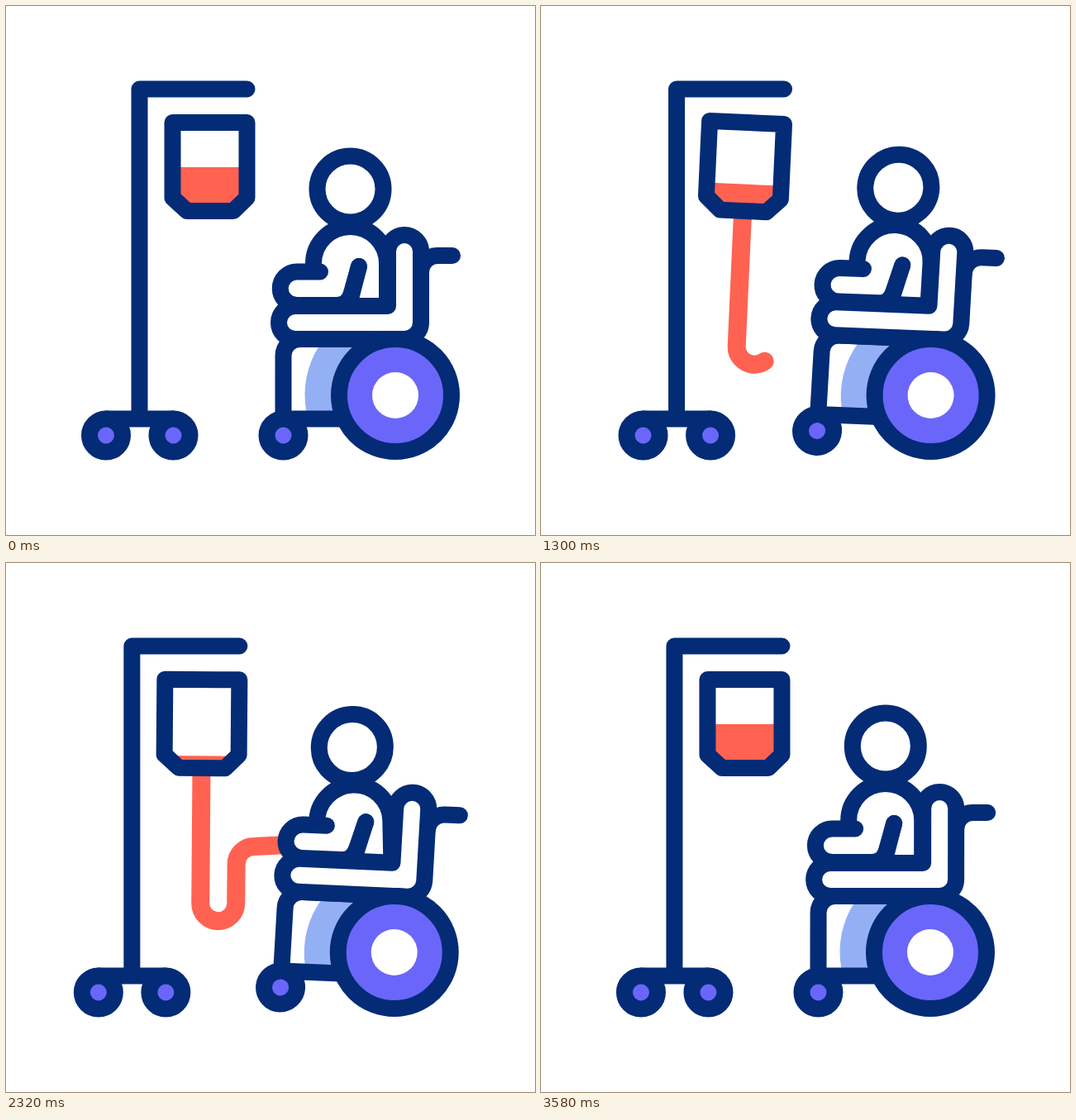
An HTML page that plays this animation: 640x640 px, repeating every 3.6 s.

```html
<!DOCTYPE html>
<html lang="en">
<head>
<meta charset="utf-8">
<title>Drip stand and wheelchair</title>
<style>
  html, body { margin: 0; width: 100%; height: 100%; overflow: hidden; background: #fff; }
  svg { display: block; width: 100vw; height: 100vh; }
  .line { fill: none; stroke: #042b76; stroke-width: 20; stroke-linecap: round; stroke-linejoin: round; }
  .white { fill: #fff; }
  .violet { fill: #6a66fa; }
  .pale { fill: #94b0f5; }
  .red { fill: #ff6251; }
  #tube { fill: none; stroke: #ff6251; stroke-width: 22; stroke-linecap: round; stroke-linejoin: round; }
</style>
</head>
<body>
<svg viewBox="0 0 640 640">
  <defs>
    <path id="bagShape" d="M201.5 141H291.5V232L275 248H219L201.5 232Z"/>
    <clipPath id="bagClip"><use href="#bagShape"/></clipPath>
  </defs>

  <path id="tube"/>

  <g id="pole">
    <path class="line" d="M291.5 100.5H161.5V499M121 499.5H202.5"/>
    <circle class="line violet" cx="121" cy="519.5" r="20"/>
    <circle class="line violet" cx="202.5" cy="519.5" r="20"/>
  </g>

  <g id="bag">
    <use href="#bagShape" class="white"/>
    <g clip-path="url(#bagClip)"><rect id="fluid" class="red" x="200" width="94" height="90"/></g>
    <use href="#bagShape" class="line"/>
  </g>

  <g id="chair">
    <path class="pale" d="M379 411A109 109 0 0 0 363.5 491H430V411Z"/>
    <path class="line" d="M440 499.5H335.5V423A20 20 0 0 1 355.5 403H480"/>
    <circle class="line violet" cx="335.5" cy="519.5" r="20"/>
    <path class="line" d="M502 322A20 20 0 0 1 522 302H540"/>
    <g id="person">
      <path class="line white" d="M372 320V311.5A44.5 44.5 0 0 1 461 311.5V363"/>
      <circle class="line white" cx="416.5" cy="221.5" r="40"/>
    </g>
    <path class="line white" d="M380 321.5H352A20 20 0 0 0 352 362H400Q414 362 418 347L427 315"/>
    <path class="line" d="M427 315L416 358"/>
    <path class="line white" d="M482 277A20 20 0 0 1 502 297V383A20 20 0 0 1 482 403H350A20 20 0 0 1 350 363H462V297A20 20 0 0 1 482 277Z"/>
  </g>

  <g id="wheel">
    <circle class="line violet" cx="471" cy="471" r="68"/>
    <circle class="white" cx="471" cy="471" r="28"/>
  </g>
</svg>
<script>
const LOOP = 3600;
const TUBE = 400;
const $ = id => document.getElementById(id);

const smooth = s => s * s * (3 - 2 * s);
const ramp = (t, from, to) => smooth(Math.min(1, Math.max(0, (t - from) / (to - from))));

// Every part sways between rest and rest on the same beats.
const beats = [0, 430, 880, 1365, 1965, 2510, 3035, 3590];
const last = beats.length - 1;

function wave(t, peak) {
  const value = i => i > 0 && i < last ? peak(i) : 0;
  let i = 1;
  while (i < last && t >= beats[i]) i++;
  const a = value(i - 1);
  return a + (value(i) - a) * ramp(t, beats[i - 1], beats[i]);
}

const odd = i => i % 2 === 1;
const polePeak = i => i === 1 ? 51 : odd(i) ? 5 : -46;
const swingPeak = i => (odd(i) ? 4.4 : -4.4) * (last - i) / (last - 1);
const chairPeak = i => [30, -34, 7, -16, 7, -24][i - 1];
const tiltPeak = i => odd(i) ? 2.6 - .3 * i : 5.9 - .2 * i;
const leanPeak = i => [-1.6, -4.7, .3, 1.3, -6.8, -3.4][i - 1];

const place = (id, m) => $(id).setAttribute("transform", m);

// Tube hangs from the bag and ends under the hand.
function tubePath(bag, chair) {
  const pt = (m, x, y) => {
    const p = m.transformPoint({ x, y });
    return p.x.toFixed(2) + " " + p.y.toFixed(2);
  };
  return `M${pt(bag, 246.5, 247)}L${pt(bag, 246.5, 411.5)}` +
    `A21.5 21.5 0 0 0 ${pt(bag, 289.5, 411.5)}L${pt(bag, 289.5, 364)}` +
    `A21.5 21.5 0 0 1 ${pt(bag, 311, 342.5)}L${pt(chair, 344, 346)}`;
}

function draw(t) {
  const late = t * 1.025 - 90; // the chair trails the pole
  const poleX = wave(t, polePeak);
  const chairX = wave(late, chairPeak);
  const tilt = wave(late, tiltPeak);
  const skew = 1.1 * (tilt - 3.3) * Math.sin(Math.PI * t / LOOP);

  const bag = new DOMMatrix()
    .translate(246.5 + poleX, 141).rotate(wave(t, swingPeak)).translate(-246.5, -141);
  const chair = new DOMMatrix()
    .translate(471 + chairX, 471).rotate(tilt)
    .translate(0, 39).skewX(skew).translate(-471, -510);

  place("pole", `translate(${poleX} 0)`);
  place("bag", bag);
  place("chair", chair);
  place("wheel", `translate(${chairX} 0)`);
  place("person", `rotate(${wave(t, leanPeak)} 461 363)`);

  const fill = ramp(t, 0, 2500), drain = ramp(t, 2500, 3400);
  $("fluid").setAttribute("y", 195 + 39 * (fill - drain));

  const tube = $("tube"), length = TUBE * (fill - drain);
  tube.setAttribute("d", tubePath(bag, chair));
  tube.setAttribute("stroke-dasharray", `${length} 2000`);
  tube.setAttribute("stroke-dashoffset", -TUBE * drain);
  tube.style.display = length > .5 ? "" : "none";
}

function tick() {
  draw(performance.now() % LOOP);
  requestAnimationFrame(tick);
}
tick();
</script>
</body>
</html>
```
